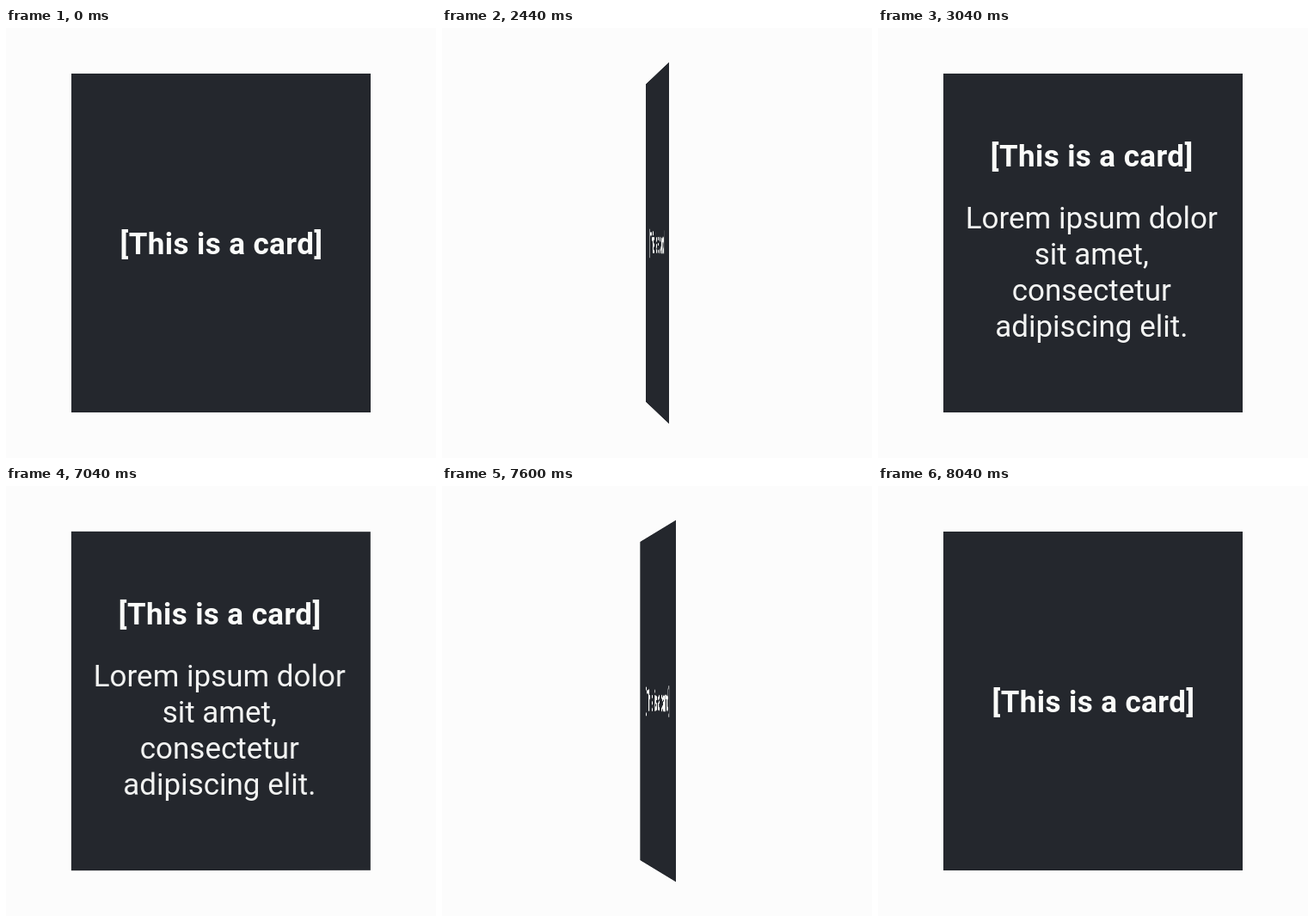
Write an HTML page that moves like this. It is 500x500 px and loops after 10 s.

```html
<!DOCTYPE html>
<html lang="en">
<head>
<meta charset="utf-8">
<title>Flip card</title>
<style>
  html, body { margin: 0; width: 100%; height: 100%; overflow: hidden; background: #fcfcfc; }
  svg { display: block; width: 500px; height: 500px; transform-origin: 250px 250px; }
  text { font: 400 35px Roboto, sans-serif; fill: #f3f4f3; text-anchor: middle; }
  .title { font-weight: 700; letter-spacing: .4px; fill: #fbfcfa; }
</style>
</head>
<body>
<svg id="card" viewBox="0 0 500 500">
  <rect x="76" y="53" width="348" height="394" fill="#24272d"/>
  <g id="front">
    <text class="title" x="250.5" y="262.5">[This is a card]</text>
  </g>
  <g id="back" visibility="hidden">
    <text class="title" x="248.7" y="161">[This is a card]</text>
    <text x="248.3" y="233">Lorem ipsum dolor</text>
    <text x="248.3" y="275">sit amet,</text>
    <text x="248.3" y="317">consectetur</text>
    <text x="248.3" y="359">adipiscing elit.</text>
  </g>
</svg>
<script>
  const LOOP = 10000, STEP = 40, FLIP = 1000;
  const OPEN = 2011, CLOSE = 7011;
  const card = document.getElementById('card');
  const front = document.getElementById('front');
  const back = document.getElementById('back');

  const clamp = v => Math.min(1, Math.max(0, v));
  const sine = v => (1 - Math.cos(Math.PI * v)) / 2;

  // Two eased quarter turns, pausing edge-on
  const turn = p => 90 * (sine(clamp(p * 2)) + sine(clamp(p * 2 - 1)));

  function angleAt(t) {
    return turn((t - OPEN) / FLIP) - turn((t - CLOSE) / FLIP);
  }

  function draw(ms) {
    const t = Math.floor((ms % LOOP + 2) / STEP) * STEP;
    const angle = angleAt(t);
    const flipped = angle > 90;
    const tilt = flipped ? 180 - angle : -angle;
    front.setAttribute('visibility', flipped ? 'hidden' : 'visible');
    back.setAttribute('visibility', flipped ? 'visible' : 'hidden');
    card.style.transform = Math.abs(tilt) < 0.01
      ? 'none'
      : `perspective(2700px) rotateY(${tilt.toFixed(3)}deg)`;
  }

  function tick() {
    draw(performance.now());
    requestAnimationFrame(tick);
  }
  tick();
</script>
</body>
</html>
```
